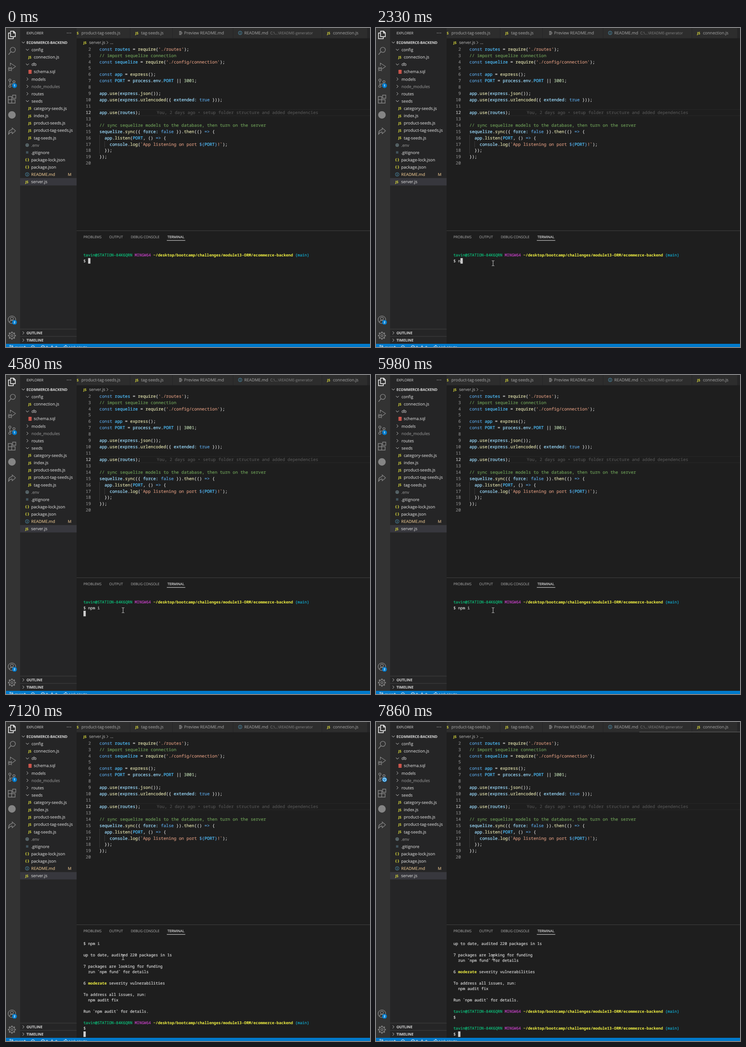
These frames come from a looping animation (799 px wide and 701 px high, 8 s). An HTML page:

```html
<!DOCTYPE html>
<html lang="en">
<head>
<meta charset="utf-8">
<title>Editor and terminal</title>
<style>
  html, body { margin: 0; width: 100%; height: 100%; overflow: hidden; background: #1e1e1e; }
  svg { display: block; }
  text, tspan { fill: currentColor; stroke: currentColor; }
  text { text-rendering: geometricPrecision; }
  .ui { font-family: "Open Sans", "Noto Sans", sans-serif; stroke-width: .15; }
  .mono { font-family: "Noto Sans Mono", "DejaVu Sans Mono", monospace; stroke-width: .24; }
  .mono [font-weight] { stroke: none; }
</style>
</head>
<body>
<svg id="stage" width="799" height="701" viewBox="0 0 799 701"></svg>
<script>
const LOOP = 8000;
const YELLOW = '#d6d63c', BLUE = '#007acc', GREY = '#858585';

// One letter in front of each run of text picks its colour.
const INK = {
  w: '#d4d4d4', b: '#569cd6', v: '#4fc1ff', p: '#9cdcfe', f: '#dcdcaa', s: '#ce9178', c: '#6a9955',
  n: '#b5cea8', d: '#505050',
  t: '#d4d4d4', G: '#0dbc79', M: '#bc3fbc', Y: '#f5f543', C: '#11a8cd', k: '#1e1e1e'
};

const rect = (x, y, w, h, fill) => `<rect x="${x}" y="${y}" width="${w}" height="${h}" fill="${fill}"/>`;
const circle = (x, y, r, fill, more = '') => `<circle cx="${x}" cy="${y}" r="${r}" fill="${fill}" ${more}/>`;
const line = (d, stroke, w = 1.2, more = '') => `<path d="${d}" fill="none" stroke="${stroke}" stroke-width="${w}" ${more}/>`;
const label = (x, y, s, color = '#cccccc', size = 9.05, more = '') =>
  `<text class="ui" x="${x}" y="${y}" color="${color}" font-size="${size}" ${more}>${s}</text>`;
const runs = (x, y, size, src) =>
  `<text class="mono" x="${x}" y="${y}" font-size="${size}" xml:space="preserve">` +
  src.split('¦').map(r => `<tspan color="${INK[r[0]]}"${r[0] === 'Y' ? ' font-weight="700"' : ''}>${r.slice(1)}</tspan>`).join('') +
  '</text>';
const bold = 'font-weight="700"';
const js = (x, y) => label(x, y, 'JS', YELLOW, 7.4, bold);
const info = (x, y) => circle(x, y, 3.9, 'none', 'stroke="#519aba" stroke-width="0.9"') +
  rect(x - .5, y - .8, 1, 3, '#519aba') + rect(x - .5, y - 2.3, 1, 1, '#519aba');
const chevron = (x, y, open, c = '#cccccc') =>
  line(open ? `M${x - 3.2} ${y - 1.6}l3.2 3.2 3.2-3.2` : `M${x - 1.6} ${y - 3.2}l3.2 3.2-3.2 3.2`, c, 1);
const gear = (x, y, r, c, w) => circle(x, y, r * .72, 'none', `stroke="${c}" stroke-width="${w}"`) +
  circle(x, y, r * .28, 'none', `stroke="${c}" stroke-width="${w}"`) +
  circle(x, y, r * .9, 'none', `stroke="${c}" stroke-width="${r * .26}" pathLength="80" stroke-dasharray="5" stroke-dashoffset="2.5"`);
const badge = (x, y, s) => circle(x, y, 5.3, BLUE) + label(x, y + 2.5, s, '#fff', 6.8, 'font-weight="600" text-anchor="middle"');

function activityBar() {
  return rect(0, 0, 31, 701, '#333333') +
    line('M10 7h7l3.5 3.5V19H10zM16.5 7v4h4M9 11H5.5v12.5H16V20', '#fff', 1.4) +
    circle(15, 48, 5.6, 'none', `stroke="${GREY}" stroke-width="1.4"`) + line('M11 52l-5.5 6.5', GREY, 1.5) +
    line('M9.5 83v-6l11.5 7.5-7.5 5.5M5 86l2 1.5M13 86l-2 1.5M4 90h2m6 0h2M5 94.5l2-1.5M13 94.5l-2-1.5M6 89.5h6', GREY) +
    circle(9, 90.3, 3.1, 'none', `stroke="${GREY}" stroke-width="1.2"`) +
    [[8.5, 114.5], [17.5, 118], [8.5, 128]].map(([x, y]) => circle(x, y, 2.4, 'none', `stroke="${GREY}" stroke-width="1.3"`)).join('') +
    line('M8.5 117v8.5M17.5 120.5c0 4-9 1-9 5', GREY, 1.3) +
    line('M5 150.5h7.5v14.5H5zM5 157.5h15v7.5h-8M14.5 147.5h7v7h-7z', GREY, 1.4) +
    circle(13, 191, 8.3, GREY) +
    line('M5.5 234c0-7 3-10.5 8-10.5v-4l7.5 6.5-7.5 6.5v-4c-4 0-6 1.5-8 5.5z', GREY, 1.3, 'stroke-linejoin="round"') +
    circle(13, 641, 8.3, 'none', `stroke="${GREY}" stroke-width="1.3"`) +
    circle(13, 638.5, 3.2, 'none', `stroke="${GREY}" stroke-width="1.3"`) +
    line('M7.5 647c1-6 10-6 11 0', GREY, 1.3) + badge(18.7, 646.7, '2') +
    gear(13, 676, 8.4, GREY, 1.3);
}

// kind, name, nested
const TREE = [
  ['open', 'config'], ['js', 'connection.js', 1], ['open', 'db'], ['db', 'schema.sql', 1],
  ['shut', 'models'], ['shut', 'node_modules'], ['shut', 'routes'], ['open', 'seeds'],
  ...['category-seeds', 'index', 'product-seeds', 'product-tag-seeds', 'tag-seeds'].map(n => ['js', n + '.js', 1]),
  ['gear', '.env'], ['mark', '.gitignore'], ['json', 'package-lock.json'], ['json', 'package.json'],
  ['info', 'README.md'], ['js', 'server.js']
];

function sidebar() {
  let s = rect(31, 0, 124, 701, '#252526') + label(45, 14, 'EXPLORER', '#bbbbbb', 7.7) +
    [134.5, 138.2, 142].map(x => circle(x, 11, .8, '#cccccc')).join('') +
    chevron(38, 31.7, true) + label(45, 34.5, 'ECOMMERCE-BACKEND', '#cccccc', 7.95, bold) +
    rect(31, 329.8, 124, 16.2, '#37373d');
  TREE.forEach(([kind, name, nested], i) => {
    const y = 31.6 + 16.12 * (i + 1), x = nested ? 53 : 46.5;
    const folder = kind === 'open' || kind === 'shut';
    const ink = name === 'README.md' ? '#e2c08d' : /^(node_modules|\.env)$/.test(name) ? '#8c8c8c' : '#cccccc';
    if (folder) s += chevron(47, y, kind === 'open');
    if (kind === 'js') s += js(x - 4, y + 2.8);
    if (kind === 'db') s += [-2.8, 0, 2.8].map(k => `<ellipse cx="${x - .2}" cy="${y + k}" rx="3.9" ry="1.5" fill="#dd5a50"/>`).join('');
    if (kind === 'gear') s += gear(x, y, 3.9, '#6d8086', 1.1);
    if (kind === 'mark') s += rect(x - 2.6, y - 2.6, 5.2, 5.2, '#41535b');
    if (kind === 'json') s += label(x - 4.3, y + 2.8, '{ }', YELLOW, 8, bold);
    if (kind === 'info') s += info(x, y);
    s += label(folder ? 56 : nested ? 61 : 55.3, y + 3.4, name, ink);
  });
  s += label(139.6, 325.2, 'M', '#e2c08d', 8.6, 'text-anchor="middle"');
  [['OUTLINE', 670], ['TIMELINE', 686]].forEach(([name, y]) => {
    s += rect(31, y - 8.8, 124, 1, '#404041') + chevron(38, y, false) + label(45, y + 2.9, name, '#cccccc', 7.95, bold);
  });
  return s;
}

function tabs() {
  const tab = '#969696', edges = [155, 273, 366, 499, 694, 794];
  let s = rect(155, 0, 644, 22.5, '#252526');
  for (let i = 0; i < 5; i++) s += rect(edges[i], 0, edges[i + 1] - edges[i] - 1, 22.5, '#2d2d2d');
  return s + label(155.3, 13.8, 'S', YELLOW, 7.4, bold) + label(165.5, 14.3, 'product-tag-seeds.js', tab) +
    js(284, 13.8) + label(296.5, 14.3, 'tag-seeds.js', tab) +
    line('M380 7.5h5M380 9.8h7M380 12.1h7M380 14.4h5', '#b0b0b0', 1) + label(391, 14.3, 'Preview README.md', tab) +
    info(514, 10.8) + label(523, 14.3, 'README.md', tab) + label(580, 14.2, 'C:\\...\\README-generator', '#747474', 8.25) +
    js(705, 13.8) + label(717.8, 14.3, 'connection.js', tab) +
    js(170, 34.6) + label(182.5, 35.2, 'server.js', '#a9a9a9') + chevron(222.5, 32, false, '#a9a9a9') +
    label(228.5, 35.2, '...', '#a9a9a9');
}

const CODE = [
  "bconst¦v routes¦w = ¦frequire¦w(¦s'./routes'¦w);",
  'c// import sequelize connection',
  "bconst¦v sequelize¦w = ¦frequire¦w(¦s'./config/connection'¦w);",
  '',
  'bconst¦v app¦w = ¦fexpress¦w();',
  'bconst¦v PORT¦w = ¦pprocess¦w.¦penv¦w.¦vPORT¦w || ¦n3001¦w;',
  '',
  'papp¦w.¦fuse¦w(¦pexpress¦w.¦fjson¦w());',
  'papp¦w.¦fuse¦w(¦pexpress¦w.¦furlencoded¦w({¦p extended:¦b true ¦w}));',
  '',
  'papp¦w.¦fuse¦w(¦proutes¦w);',
  '',
  'c// sync sequelize models to the database, then turn on the server',
  'psequelize¦w.¦fsync¦w({¦p force:¦b false ¦w}).¦fthen¦w(()¦b =>¦w {',
  'p  app¦w.¦flisten¦w(¦vPORT¦w, ()¦b =>¦w {',
  'p    console¦w.¦flog¦w(¦s`App listening on port ¦b${¦vPORT¦b}¦s!`¦w);',
  'w  });',
  'w});',
  ''
];

function editor() {
  const top = 46.6, pitch = 13.92;
  let s = rect(203, 178.6, 596, 1, '#292929') + rect(203, 192.4, 596, 1, '#292929') +
    rect(205, top + pitch * 14 - 7, .8, pitch * 3, '#404040') + rect(216.2, top + pitch * 15 - 7, .8, pitch, '#404040');
  CODE.forEach((src, i) => {
    const y = top + pitch * i + 3.1;
    s += `<text class="mono" x="186.3" y="${y}" font-size="9.4" text-anchor="end" color="${i === 10 ? '#c6c6c6' : GREY}">${i + 2}</text>`;
    if (src) s += runs(205, y, 9.4, src);
  });
  return s + runs(331, top + pitch * 10 + 3.1, 9.4, 'dYou, 2 days ago • setup folder structure and added dependencies');
}

function panel() {
  const names = [[170, 'PROBLEMS'], [226.5, 'OUTPUT'], [274, 'DEBUG CONSOLE'], [354.5, 'TERMINAL']];
  return rect(155, 445, 644, 1, '#414141') + rect(353, 466.3, 40.5, 1, '#e7e7e7') +
    names.map(([x, n]) => label(x, 462.2, n, n === 'TERMINAL' ? '#e7e7e7' : '#989898', 7.68)).join('');
}

function statusBar() {
  const ring = 'stroke="#fff" stroke-width="1"';
  return rect(0, 694, 799, 7, BLUE) + circle(9.5, 698.5, 1.4, 'none', ring) + circle(14, 699.5, 1.4, 'none', ring) +
    label(19, 705.2, 'main*', '#fff', 8.4) + circle(59, 702, 3.8, 'none', ring) +
    circle(81, 702, 4, 'none', ring) + line('M79.5 700.5l3 3m0-3l-3 3', '#fff', .9) + label(87.5, 705.2, '0', '#fff', 8.4) +
    line('M97 706l4-8 4 8z', '#fff', 1) + label(108, 705.2, '0', '#fff', 8.4) +
    line('M126 704c0-4 2-5 5-5v-2l4 4', '#fff', 1) + label(138, 705.2, 'Link Hosts', '#fff', 8.4);
}

// Terminal grid
const COL = 5.117, ROW = 12.45, LEFT = 170, TOP = 486.8, SIZE = COL / .6;
const row = (src, r) => src ? runs(LEFT, TOP + ROW * r + 2.9, SIZE, src) : '';
const block = (col, r, n = 1, fill = '#cccccc') => rect(LEFT + COL * col, TOP + ROW * r - 6.1, COL * n, 12.2, fill);

const PROMPT = 'Gtavin@STATION-84K6QRN¦M MINGW64¦Y ~/desktop/bootcamp/challenges/module13-ORM/ecommerce-backend¦C (main)';
const LOG = [
  PROMPT, 't$ npm i', '', 'tup to date, audited 220 packages in 1s', '',
  't7 packages are looking for funding', 't  run `npm fund` for details', '',
  't6 ¦Ymoderate¦t severity vulnerabilities', '',
  'tTo address all issues, run:', 't  npm audit fix', '', 'tRun `npm audit` for details.', '',
  PROMPT, 't$', '', PROMPT, 't$'
];

const log = (from, to, shift) => LOG.slice(from, to).map((s, i) => row(s, from + i - shift)).join('');
const typed = cmd => row(PROMPT, 1) + row('t$ ' + cmd, 2) + block(2 + cmd.length, 2);
const waiting = log(0, 2, -1);

// npm progress: filled cells, spinner, stage, level, prefix, message
function progress(done, spin, stage, level, prefix, msg) {
  const silly = level === 'sill', at = 24 + stage.length;
  return waiting + block(1, 3, 18, '#666666') + block(1, 3, done, '#e5e5e5') + (silly ? block(at, 3, 4) : '') +
    row(`t[${' '.repeat(18)}] ${spin} ${stage} ¦${silly ? 'k' : 'G'}${level}¦M ${prefix}¦t ${msg}`, 3);
}
const ideal = (done, spin) => progress(done, spin, 'idealTree:', 'timing', 'idealTree', 'Completed in 512ms');
const reify = (done, spin) => progress(done, spin, 'reify:fsevents:', 'sill', 'reify', 'mark deleted [');

const SCREENS = [
  [0, typed('')], [2330, typed('n')], [2530, typed('np')], [2730, typed('npm')], [3120, typed('npm ')],
  [3590, typed('npm i')], [3860, typed('npm ')],
  [4580, waiting + block(0, 3)], [5980, waiting],
  [6050, progress(2, '/', 'idealTree:', 'sill', 'idealTree', 'buildDeps')],
  [6120, ideal(4, '-')], [6260, ideal(7, '\\')], [6330, ideal(10, '|')],
  [6400, reify(18, '/')], [6470, reify(18, '-')], [6590, reify(18, '\\')], [6720, reify(18, '/')], [6790, reify(18, '-')],
  [6860, log(0, 14, -1) + block(0, 15)],
  [7120, log(1, 17, 1) + block(0, 16)],
  [7320, log(2, 19, 2)],
  [7390, log(3, 20, 3) + block(2, 16)]
];

const stage = document.getElementById('stage');
stage.innerHTML = rect(0, 0, 799, 701, '#1e1e1e') + activityBar() + sidebar() + tabs() + editor() + panel() +
  `<g id="term"></g>` + statusBar() +
  `<g id="count">${badge(18.8, 126.6, '1')}</g>` +
  `<g id="clock">${circle(18.8, 126.6, 5.3, BLUE) + circle(18.8, 126.6, 3.4, 'none', 'stroke="#fff" stroke-width="1.1"') + line('M18.8 124.5v2.3h1.7', '#fff', .9)}</g>` +
  `<g id="slider">${rect(578, 21, 221, 1.7, '#4c4c4c')}</g>` +
  `<g id="click">${circle(255, 516, 8.8, '#ffff00', 'opacity="0.47"')}</g>` +
  `<g id="mouse">${line('M-2.7-5.5h2l.7.7.7-.7h2M0-5V5M-2.7 5.5h2l.7-.7.7.7h2', '#d0d0d0', 1)}</g>`;

const el = Object.fromEntries(['term', 'count', 'clock', 'slider', 'click', 'mouse'].map(id => [id, document.getElementById(id)]));
const show = (node, on) => node.setAttribute('visibility', on ? 'visible' : 'hidden');
const curve = (a, b, c, u) => a * (1 - u) ** 2 + 2 * b * u * (1 - u) + c * u * u;

let shown = null;
function draw(t) {
  let screen = SCREENS[0];
  for (const s of SCREENS) if (t >= s[0]) screen = s;
  if (screen !== shown) el.term.innerHTML = (shown = screen)[1];

  // The pointer sweeps in over eight held positions.
  const u = Math.min(7, Math.max(0, Math.floor((t - 190) / 67.1))) / 7;
  const k = 1 - (1 - u) ** 2;
  el.mouse.setAttribute('transform', `translate(${curve(539, 330, 257, k)} ${curve(614, 410, 517, k)})`);
  show(el.mouse, t >= 190);
  show(el.click, t >= 920 && t < 1120);
  show(el.count, t < 7720);
  show(el.clock, t >= 7720);
  show(el.slider, t >= 7860);
}

const start = performance.now();
function tick() {
  draw((performance.now() - start) % LOOP);
  requestAnimationFrame(tick);
}
tick();
</script>
</body>
</html>
```
